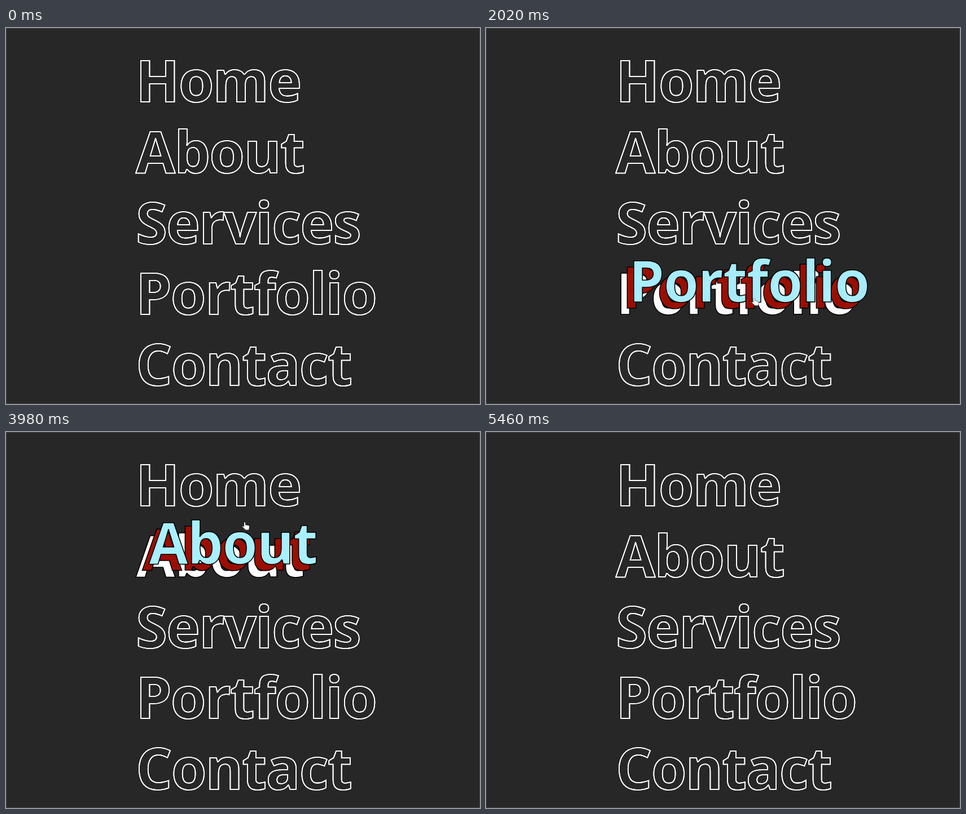
Animation of 840 by 667 pixels, one loop 5.79 s. Source, as an HTML page with a canvas:

```html
<!DOCTYPE html>
<html lang="en">
<head>
<meta charset="utf-8">
<title>Layered menu hover</title>
<style>
  html, body { margin: 0; width: 100%; height: 100%; overflow: hidden; background: #272727; }
  canvas { display: block; }
</style>
</head>
<body>
<canvas id="stage" width="840" height="667"></canvas>
<script>
const ctx = document.getElementById('stage').getContext('2d');
const LOOP = 5790, FADE = 500, SHIFT = 23;
const LEFT = 230, FIRST_BASELINE = 131, LINE = 125.8;
const LAYERS = ['255 255 255', '156 14 0', '169 240 255'];
const LABELS = ['Home', 'About', 'Services', 'Portfolio', 'Contact'];

// The pointer climbs the menu; each visit lasts until the next one starts.
const visits = [
  { label: 'Contact', at: 620 },
  { label: 'Portfolio', at: 1600 },
  { label: 'Services', at: 2650 },
  { label: 'About', at: 3320 },
  { label: 'Home', at: 4170 },
  { label: 'About', at: 4780 },
  { label: null, at: 4895 },
];

const pointerKeys = [
  { at: 560, x: 470, y: 668 },
  { at: 760, x: 474, y: 592 },
  { at: 1450, x: 474, y: 586 },
  { at: 2020, x: 474, y: 479 },
  { at: 3190, x: 443, y: 279 },
  { at: 3980, x: 422, y: 160 },
  { at: 4650, x: 460, y: 85 },
  { at: 4890, x: 692, y: 294 },
  { at: 5200, x: 809, y: 668 },
];

const arrow = new Path2D('M0 0V12.5L3 9.8 5 14 7 13 5 9H9Z');
const hand = new Path2D('M0 1Q1-.7 2 1V5L8 6.2Q9.5 7 9 9L8 13.5H2.5L-3 8Q-2.5 6 0 8.5Z');

const mix = (a, b, k) => a + (b - a) * k;

// CSS "ease", cubic-bezier(.25, .1, .25, 1), solved by bisection.
function ease(x) {
  if (x <= 0) return 0;
  if (x >= 1) return 1;
  const bezier = (u, a, b) => 3 * u * (1 - u) ** 2 * a + 3 * u * u * (1 - u) * b + u ** 3;
  let u = .5;
  for (let step = .25; step > 1e-5; step /= 2) u += bezier(u, .25, .25) < x ? step : -step;
  return bezier(u, .1, 1);
}

function hoverState(label, t) {
  const i = visits.findLastIndex(v => v.label === label && v.at <= t);
  if (i < 0) return { amount: 0, inside: false };
  const enter = visits[i].at, leave = visits[i + 1].at;
  if (t < leave) return { amount: ease((t - enter) / FADE), inside: true };
  const peak = ease((leave - enter) / FADE);
  return { amount: peak * (1 - ease((t - leave) / (FADE * peak))), inside: false };
}

function drawLabel(label, row, t) {
  const { amount, inside } = hoverState(label, t);
  LAYERS.forEach((rgb, depth) => {
    // The bottom layer returns to its outline at once on leave.
    const tint = depth || inside ? amount : 0;
    const shift = depth / 2 * SHIFT * amount;
    const x = LEFT + shift, y = FIRST_BASELINE + row * LINE - shift;
    const grey = Math.round(255 * (1 - tint));
    ctx.fillStyle = `rgb(${rgb} / ${tint})`;
    ctx.strokeStyle = `rgb(${grey} ${grey} ${grey})`;
    ctx.fillText(label, x, y);
    ctx.strokeText(label, x, y);
  });
}

function drawPointer(t) {
  const next = pointerKeys.findIndex(key => key.at > t);
  if (next < 1) return;
  const a = pointerKeys[next - 1], b = pointerKeys[next];
  const k = (t - a.at) / (b.at - a.at);
  const hovering = t >= visits[0].at && t < visits.at(-1).at - 10;
  const shape = hovering ? hand : arrow;
  ctx.save();
  ctx.translate(mix(a.x, b.x, k), mix(a.y, b.y, k));
  ctx.lineWidth = 1;
  ctx.strokeStyle = '#111';
  ctx.fillStyle = '#fff';
  ctx.stroke(shape);
  ctx.fill(shape);
  ctx.restore();
}

function draw(t) {
  ctx.fillStyle = '#272727';
  ctx.fillRect(0, 0, 840, 667);
  ctx.lineWidth = 1;
  ctx.strokeStyle = '#484848';
  ctx.strokeRect(.5, .5, 839, 666);
  ctx.font = 'bold 101.4px "Open Sans", "Noto Sans", sans-serif';
  ctx.letterSpacing = '-1.9px';
  ctx.lineWidth = 1.6;
  ctx.miterLimit = 4;
  LABELS.forEach((label, row) => drawLabel(label, row, t));
  drawPointer(t);
}

const start = performance.now();
function tick() {
  draw((performance.now() - start) % LOOP);
  requestAnimationFrame(tick);
}
tick();
</script>
</body>
</html>
```
